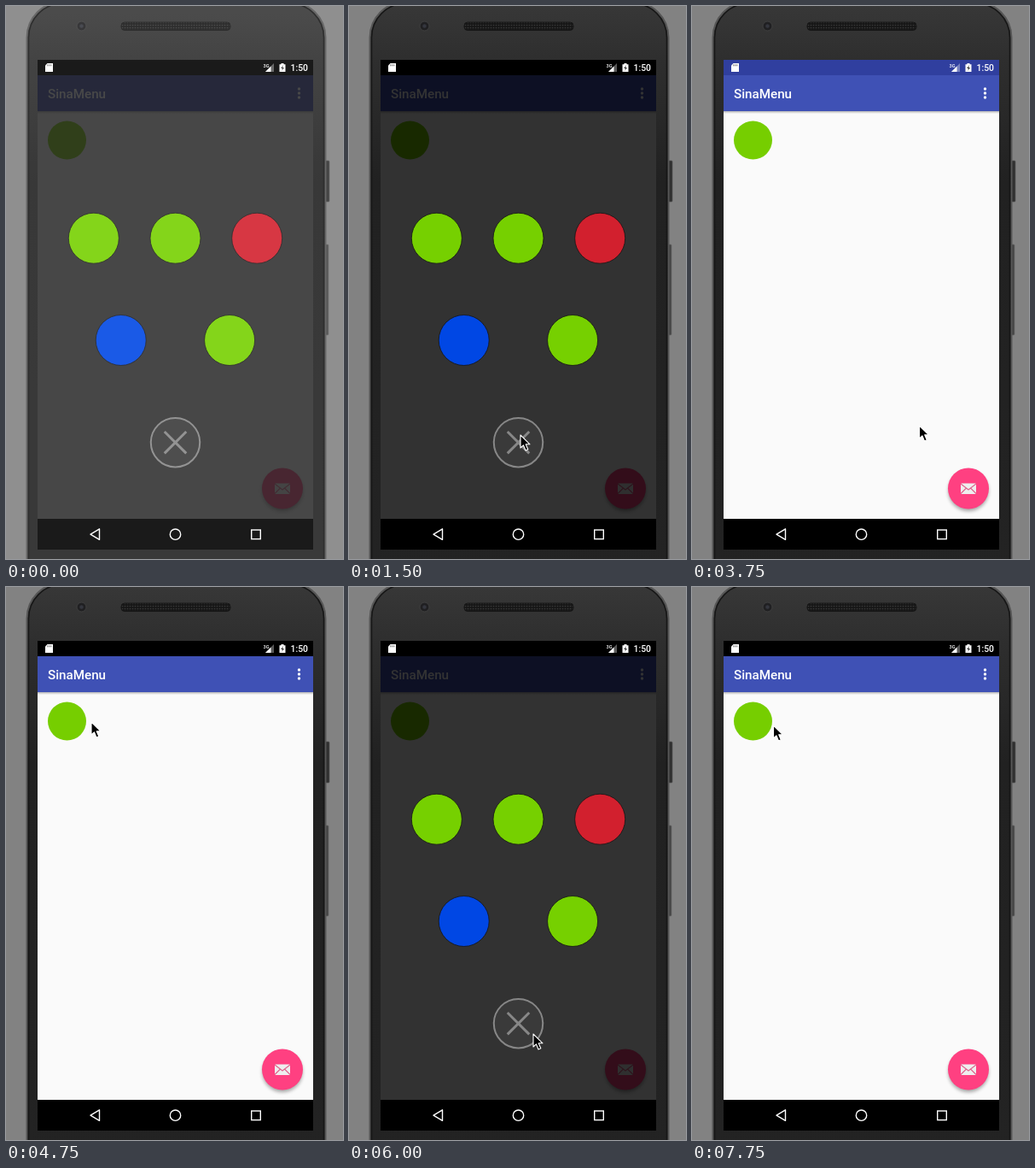
These frames come from a looping animation (395x647 px, 8 s). An HTML page:

```html
<!DOCTYPE html>
<html lang="en">
<head>
<meta charset="utf-8">
<title>Pop-up menu demo</title>
<style>
  html, body { margin: 0; width: 100%; height: 100%; overflow: hidden; background: #828282; }
  svg { display: block; width: 100%; height: 100%; }
  text { font-family: Roboto, sans-serif; font-weight: 500; fill: #fff; }
</style>
</head>
<body>
<svg viewBox="0 0 395 647">
  <defs>
    <linearGradient id="body" x2="0" y2="1">
      <stop offset="0" stop-color="#383838"/>
      <stop offset=".1" stop-color="#2e2e2e"/>
      <stop offset=".3" stop-color="#212121"/>
      <stop offset="1" stop-color="#232323"/>
    </linearGradient>
    <linearGradient id="barShadow" x2="0" y2="1">
      <stop offset="0" stop-opacity=".28"/>
      <stop offset="1" stop-opacity="0"/>
    </linearGradient>
    <pattern id="mesh" width="3" height="3" patternUnits="userSpaceOnUse">
      <rect width="3" height="3" fill="#171717"/>
      <circle cx="1.5" cy="1.5" r=".8" fill="#383838"/>
    </pattern>
    <filter id="soft" x="-30%" y="-30%" width="160%" height="160%"><feGaussianBlur stdDeviation="2.2"/></filter>
  </defs>

  <!-- phone -->
  <rect width="395" height="647" fill="#828282"/>
  <rect x="374" y="181" width="5" height="48" rx="1" fill="#303030" stroke="#555" stroke-width=".7"/>
  <rect x="374" y="279" width="4" height="106" rx="1" fill="#444" stroke="#686868" stroke-width=".7"/>
  <rect x="24.5" y="-5" width="350" height="700" rx="42" fill="url(#body)" stroke="#565656" stroke-width="2"/>
  <rect x="26.5" y="-3" width="346" height="696" rx="40" fill="none" stroke="#161616" stroke-width="1.5"/>
  <circle cx="88.5" cy="23.5" r="5.5" fill="#202022" stroke="#414141"/>
  <circle cx="88.5" cy="23.5" r="2.2" fill="#34363e"/>
  <rect x="135" y="19" width="128" height="9.5" rx="4" fill="url(#mesh)" stroke="#161616"/>

  <!-- app -->
  <rect x="37" y="63" width="323" height="573"/>
  <rect id="status" x="37" y="63" width="323" height="18" fill="#303f9f"/>
  <rect x="37" y="123" width="323" height="477" fill="#fafafa"/>
  <rect x="37" y="81" width="323" height="42" fill="#3f51b5"/>
  <rect x="37" y="123" width="323" height="3" fill="url(#barShadow)"/>
  <text x="49" y="108" font-size="15.2">SinaMenu</text>
  <g fill="#fff">
    <circle cx="343.5" cy="97" r="1.7"/><circle cx="343.5" cy="102" r="1.7"/><circle cx="343.5" cy="107" r="1.7"/>
  </g>
  <circle cx="71.5" cy="157" r="22.5" fill="#76ce00"/>
  <circle cx="324" cy="567.5" r="23.5" opacity=".35" filter="url(#soft)"/>
  <circle cx="324" cy="564.5" r="24" fill="#ff4081"/>
  <rect x="315" y="558.5" width="18" height="12.5" rx="1" fill="#eee"/>
  <path d="M315 559l9 7 9-7M315 570.5l6.5-6.5M333 570.5l-6.5-6.5" fill="none" stroke="#e0628c" stroke-width="1.1"/>

  <!-- dimmed layer with the menu -->
  <g id="overlay">
    <rect x="37" y="81" width="323" height="519" opacity=".8"/>
    <g id="items" stroke="#151515" stroke-width=".8"></g>
    <g id="close" fill="none" stroke="#878787">
      <circle r="28.7" fill="#fff" fill-opacity=".04" stroke-width="2"/>
      <path d="M-18 0H18M0-18V18" stroke-width="3"/>
    </g>
  </g>

  <!-- status and navigation icons -->
  <path d="M48.5 67h6.5v10h-9v-7.5z" fill="#fff"/>
  <path d="M48.8 68.3v2M50.8 68.3v2M52.8 68.3v2" stroke="#444" stroke-width=".8"/>
  <text x="301.5" y="72" font-size="5.6">3G</text>
  <path d="M314 67v10h-10z" fill="#fff" opacity=".35"/>
  <path d="M310.5 70.5V77H304z" fill="#fff"/>
  <path d="M322.5 67h3v1.2h2V77h-7v-8.8h2z" fill="#fff"/>
  <path d="M325 69l-2.8 4h1.8l-.8 3 2.8-4h-1.8z" fill="#333"/>
  <text x="333.5" y="76" font-size="10.4">1:50</text>
  <g fill="none" stroke="#fff" stroke-width="1.4">
    <path d="M109.5 611.8v12.6l-10.5-6.3z" stroke-linejoin="round"/>
    <circle cx="198.5" cy="618.2" r="6.2"/>
    <rect x="287.7" y="613" width="10.6" height="10.6"/>
  </g>

  <path id="cursor" d="M0 0V15L3.4 11.8 6 18 8.8 16.8 6.2 10.8H11Z" stroke="#fff" stroke-width="1.1" stroke-linejoin="round"/>
  <rect id="veil" width="395" height="647" fill="#fff" opacity=".1"/>
</svg>

<script>
const DURATION = 8000, STEP = 250;
const CENTER = { x: 198.5, y: 510.7 };
const GREEN = '#76d000', RED = '#d2202e', BLUE = '#0047e4';
const $ = id => document.getElementById(id);

// Offsets of the menu items from the close button
const items = [
  [-95.7, -239, GREEN], [0, -239, GREEN], [95.7, -239, RED],
  [-63.8, -119.7, BLUE], [63.6, -119.7, GREEN]
].map(([dx, dy, color]) => {
  const node = document.createElementNS('http://www.w3.org/2000/svg', 'circle');
  node.setAttribute('r', 29.5);
  node.setAttribute('fill', color);
  $('items').append(node);
  return { dx, dy, node };
});

// Pointer path: time, x, y
const pointer = [
  [1000, 326, 378], [1250, 246, 478], [1500, 201, 502], [1750, 201, 502],
  [2000, 225, 495], [2250, 234, 494], [2500, 234, 494], [3000, 213, 497],
  [3250, 213, 497], [3750, 266.5, 491], [4250, 190, 310], [4750, 100, 158],
  [5000, 100, 158], [5500, 165, 390], [6000, 216, 523], [6250, 219, 514],
  [6750, 219, 514], [7250, 140, 290], [7500, 98, 170], [7750, 95.5, 162]
];

function pointerAt(t) {
  const i = pointer.findIndex(([time]) => time >= t);
  if (i < 1) return pointer[0].slice(1);
  const [t0, x0, y0] = pointer[i - 1], [t1, x1, y1] = pointer[i];
  const p = (t - t0) / (t1 - t0);
  return [x0 + (x1 - x0) * p, y0 + (y1 - y0) * p];
}

const within = (t, from, to) => t >= from && t < to;

function draw(t) {
  const menuOpen = t < 3500 || within(t, 5000, 6500);
  const closing = within(t, 3500, 3750) || within(t, 6500, 6750);
  const popupReady = within(t, 4750, 5000) || t >= 7750;
  const overshoot = within(t, 5000, 5250);
  const spread = overshoot ? 1.12 : 1;

  $('status').setAttribute('fill', menuOpen || popupReady ? '#000' : closing ? '#25307a' : '#303f9f');
  $('overlay').setAttribute('opacity', menuOpen ? 1 : closing ? .19 : 0);
  $('items').style.display = $('close').style.display = menuOpen ? '' : 'none';
  $('close').setAttribute('transform', `translate(${CENTER.x} ${CENTER.y}) rotate(${overshoot ? 5 : 45})`);
  for (const { dx, dy, node } of items) {
    node.setAttribute('cx', CENTER.x + dx * spread);
    node.setAttribute('cy', CENTER.y + dy * spread);
  }

  $('cursor').style.display = t < 1000 ? 'none' : '';
  $('cursor').setAttribute('transform', `translate(${pointerAt(t)})`);
  $('veil').style.display = t < STEP ? '' : 'none';
}

function tick() {
  const t = performance.now() % DURATION;
  draw(Math.floor(t / STEP) * STEP);
  requestAnimationFrame(tick);
}
tick();
</script>
</body>
</html>
```
